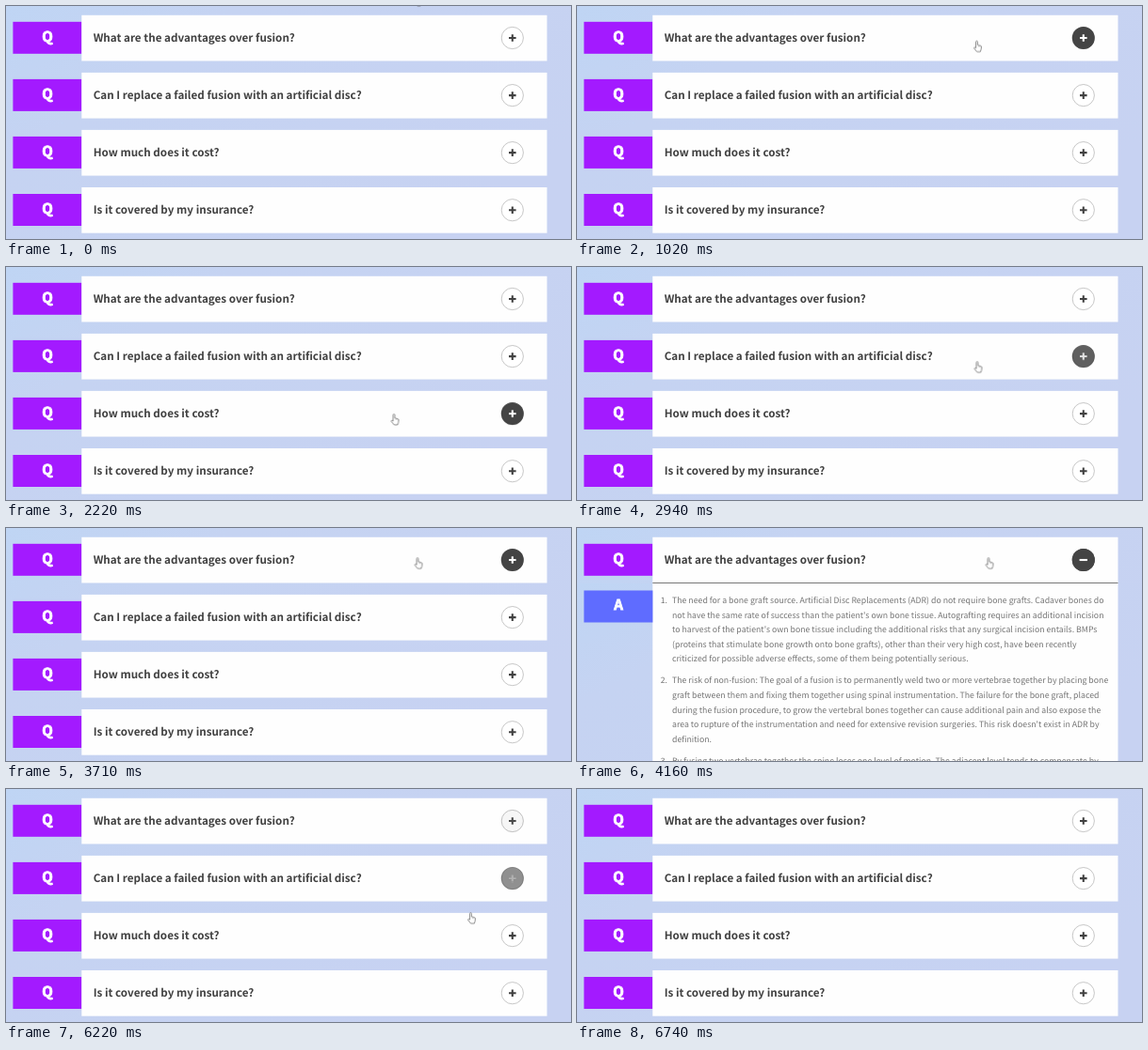
Write an HTML page that moves like this. It is 600 px wide and 248 px high and loops after 7110 ms.

```html
<!DOCTYPE html>
<html lang="en">
<head>
<meta charset="utf-8">
<title>Questions and answers</title>
<style>
html, body { margin: 0; width: 100%; height: 100%; overflow: hidden; }
svg { display: block; width: 600px; height: 248px; }
text {
  font-family: "Noto Sans CJK JP", "Noto Sans CJK SC", "Noto Sans CJK", "Open Sans", sans-serif;
  text-rendering: geometricPrecision;
}
.title { font-size: 11.67px; font-weight: 700; fill: #414141; }
.badge { font-size: 15px; font-weight: 900; fill: #fff; stroke: #fff; stroke-width: .8; text-anchor: middle; }
.body { font-size: 8.76px; fill: #747474; }
.card { fill: #fefefe; }
.q { fill: #a31aff; }
.a { fill: #5f6cff; }

.hover, .hand, .answer { animation: 7110ms linear infinite; }
.hover { opacity: 0; }
.h1 { animation-name: hover1; }
.h2 { animation-name: hover2; }
.h3 { animation-name: hover3; }
.h4 { animation-name: hover4; }
.answer { animation-name: open; animation-timing-function: step-end; visibility: hidden; }
.hand { animation-name: move; animation-timing-function: ease-in-out; }

@keyframes hover1 {
  0%, 4.92% { opacity: 0; }
  7.74%, 16.17% { opacity: 1; }
  18.99%, 49.23% { opacity: 0; }
  51.9%, 84.81% { opacity: 1; }
  87.62%, 100% { opacity: 0; }
}
@keyframes hover2 {
  0%, 17.3% { opacity: 0; }
  19.97%, 26.02% { opacity: 1; }
  28.83%, 38.96% { opacity: 0; }
  41.77%, 48.38% { opacity: 1; }
  51.2%, 85.51% { opacity: 0; }
  87.34% { opacity: .65; }
  89.17%, 100% { opacity: 0; }
}
@keyframes hover3 {
  0%, 27.14% { opacity: 0; }
  29.96%, 37.83% { opacity: 1; }
  40.65%, 87.76% { opacity: 0; }
  89.59% { opacity: .65; }
  91.42%, 100% { opacity: 0; }
}
@keyframes hover4 {
  0%, 90.15% { opacity: 0; }
  92.41% { opacity: .8; }
  94.7%, 100% { opacity: 0; }
}
@keyframes open {
  0% { visibility: hidden; }
  58.509% { visibility: visible; }
  76.09%, 100% { visibility: hidden; }
}
@keyframes move {
  0% { transform: translate(433px, -12px); }
  .84%, 2.81% { transform: translate(430px, -14px); }
  8.16%, 13.64% { transform: translate(421px, 35px); }
  19.97%, 24.3% { transform: translate(419px, 97.7px); }
  31.22%, 34.88% { transform: translate(408.5px, 156px); }
  41.35%, 44.87% { transform: translate(421.5px, 100.2px); }
  52.18%, 82.42% { transform: translate(433.5px, 31.2px); }
  93.11%, 100% { transform: translate(557px, 250px); }
}
</style>
</head>
<body>
<svg viewBox="0 0 600 248">
  <defs>
    <linearGradient id="sky" x2="1" y2=".6">
      <stop offset="0" stop-color="#bfd5f4"/>
      <stop offset=".3" stop-color="#c5d3f2"/>
      <stop offset="1" stop-color="#c7d2f2"/>
    </linearGradient>
    <path id="plus" d="M-3.8 0H3.8M0-3.8V3.8" stroke-width="2.1"/>
    <g id="row">
      <rect class="q" x="7.4" y="16.8" width="73" height="34"/>
      <rect class="card" x="80.3" y="9.8" width="494.2" height="48.7"/>
      <text class="badge" x="44" y="38">Q</text>
      <g transform="translate(537.8 34)">
        <circle r="11.6" fill="#fff" stroke="#b9b9b9" stroke-width=".8"/>
        <use href="#plus" stroke="#414141"/>
      </g>
    </g>
    <g id="lit" transform="translate(537.8 34)">
      <circle r="12" fill="#444"/>
      <use href="#plus" stroke="#fff"/>
    </g>
  </defs>

  <rect width="600" height="248" fill="url(#sky)"/>

  <g>
    <use href="#row"/>
    <text class="title" x="92.7" y="38">What are the advantages over fusion?</text>
    <g class="hover h1"><use href="#lit"/></g>
  </g>
  <g transform="translate(0 61.1)">
    <use href="#row"/>
    <text class="title" x="92.7" y="38">Can I replace a failed fusion with an artificial disc?</text>
    <g class="hover h2"><use href="#lit"/></g>
  </g>
  <g transform="translate(0 122.1)">
    <use href="#row"/>
    <text class="title" x="92.7" y="38">How much does it cost?</text>
    <g class="hover h3"><use href="#lit"/></g>
  </g>
  <g transform="translate(0 183.2)">
    <use href="#row"/>
    <text class="title" x="92.7" y="38">Is it covered by my insurance?</text>
    <g class="hover h4"><use href="#lit"/></g>
  </g>

  <g class="answer">
    <rect y="59" width="600" height="189" fill="url(#sky)"/>
    <rect class="card" x="80.3" y="58" width="494.2" height="190"/>
    <rect x="80.3" y="58" width="494.2" height="1" fill="#777"/>
    <rect class="a" x="7.4" y="66.5" width="73" height="34"/>
    <text class="badge" x="44" y="87.2">A</text>
    <circle cx="537.8" cy="34" r="12" fill="#444"/>
    <path d="M533.6 34h8.4" stroke="#fff" stroke-width="2.1"/>
    <text class="body" y="80">
      <tspan x="88.7">1.</tspan>
      <tspan x="101">The need for a bone graft source. Artificial Disc Replacements (ADR) do not require bone grafts. Cadaver bones do</tspan>
      <tspan x="101" dy="15.6">not have the same rate of success than the patient's own bone tissue. Autografting requires an additional incision</tspan>
      <tspan x="101" dy="15.6">to harvest of the patient's own bone tissue including the additional risks that any surgical incision entails. BMPs</tspan>
      <tspan x="101" dy="15.6">(proteins that stimulate bone growth onto bone grafts), other than their very high cost, have been recently</tspan>
      <tspan x="101" dy="15.6">criticized for possible adverse effects, some of them being potentially serious.</tspan>
    </text>
    <text class="body" y="165.3">
      <tspan x="88.7">2.</tspan>
      <tspan x="101">The risk of non-fusion: The goal of a fusion is to permanently weld two or more vertebrae together by placing bone</tspan>
      <tspan x="101" dy="15.6">graft between them and fixing them together using spinal instrumentation. The failure for the bone graft, placed</tspan>
      <tspan x="101" dy="15.6">during the fusion procedure, to grow the vertebral bones together can cause additional pain and also expose the</tspan>
      <tspan x="101" dy="15.6">area to rupture of the instrumentation and need for extensive revision surgeries. This risk doesn't exist in ADR by</tspan>
      <tspan x="101" dy="15.6">definition.</tspan>
    </text>
    <text class="body" y="250.5">
      <tspan x="88.7">3.</tspan>
      <tspan x="101">By fusing two vertebrae together the spine loses one level of motion. The adjacent level tends to compensate by</tspan>
    </text>
  </g>

  <g class="hand">
    <path d="M2.6 8V1.5a.9.9 0 0 1 1.8 0V4.8l3 .7q1.2.3 1.1 1.4L8.1 9.8 7.3 12H3.7L.7 8.4q-.2-1.1.8-1.1z"
      fill="#fff" stroke="#666" stroke-width=".75" stroke-linejoin="round"/>
    <path d="M5.7 5.4V7M7.1 5.8V7.2" stroke="#888" stroke-width=".4"/>
  </g>
</svg>
</body>
</html>
```
